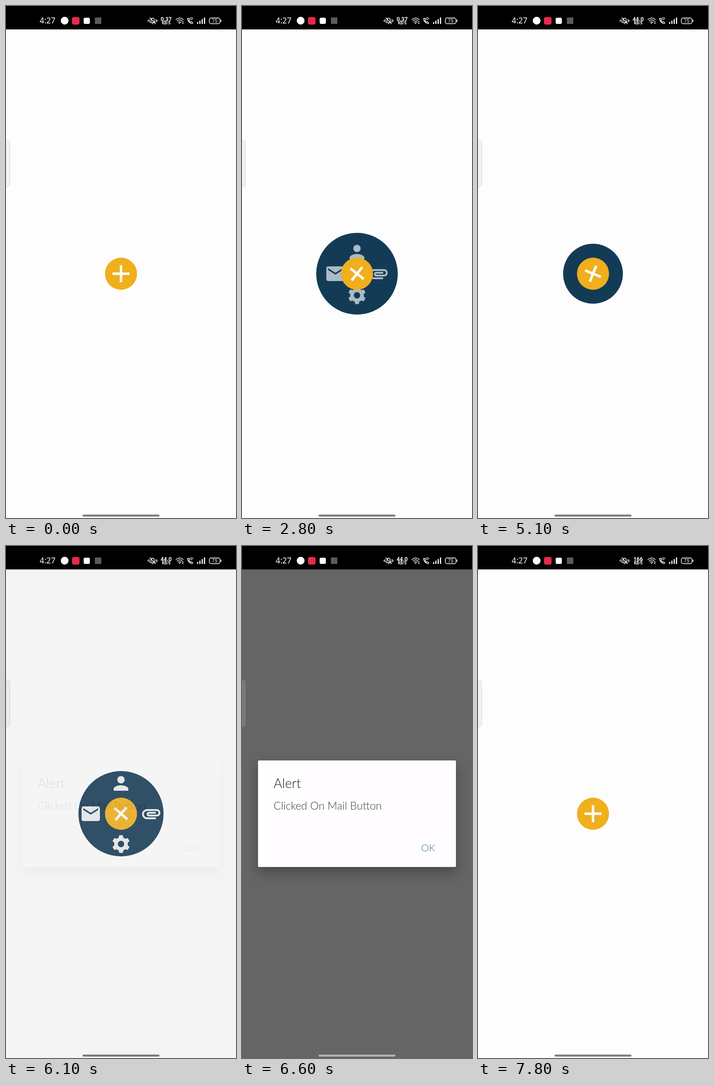
Write an HTML page that moves like this. It is 502 px wide and 1115 px high and loops after 8 s.

```html
<!DOCTYPE html>
<html lang="en">
<head>
<meta charset="utf-8">
<title>Radial menu</title>
<style>
  html, body { margin: 0; width: 100%; height: 100%; overflow: hidden; background: #fefdfe; }
  svg { display: block; width: 502px; height: 1115px; }
  .line { fill: none; stroke: #fff; stroke-width: 1.5; stroke-linecap: round; stroke-linejoin: round; }
  .bold { font: 700 12px Roboto, sans-serif; fill: #fff; text-anchor: middle; }
  #dialog { font-family: Lato, sans-serif; font-weight: 300; }
  #dialog rect { filter: drop-shadow(0 12px 13px rgba(0, 0, 0, .28)); }
</style>
</head>
<body>
<svg viewBox="0 0 502 1115">
  <rect width="502" height="1115" fill="#fefdfe"/>

  <g transform="translate(251 583)">
    <circle id="menu" r="34" fill="#143b56"/>
    <g id="icons" fill="#e9edf0">
      <g data-x="0" data-y="-1"><path transform="scale(2) translate(-12 -12)" d="M12 12c2.2 0 4-1.8 4-4s-1.8-4-4-4-4 1.8-4 4 1.8 4 4 4zm0 2c-2.7 0-8 1.3-8 4v2h16v-2c0-2.7-5.3-4-8-4z"/></g>
      <g data-x="1" data-y="0"><path transform="scale(2) translate(-12 -12)" d="M2 12.5C2 9.46 4.46 7 7.5 7H18c2.2 0 4 1.8 4 4s-1.8 4-4 4H9.5C8.1 15 7 13.9 7 12.5S8.1 10 9.5 10H17v2H9.4c-.55 0-.55 1 0 1H18c1.1 0 2-.9 2-2s-.9-2-2-2H7.5C5.6 9 4 10.6 4 12.5S5.6 16 7.5 16H17v2H7.5C4.46 18 2 15.5 2 12.5z"/></g>
      <g data-x="0" data-y="1"><g id="gear" transform="scale(2)"><circle r="5.45" fill="none" stroke="#e9edf0" stroke-width="3.9"/></g></g>
      <g data-x="-1" data-y="0"><path transform="scale(2) translate(-12 -12)" d="M20 4H4c-1.1 0-2 .9-2 2v12c0 1.1.9 2 2 2h16c1.1 0 2-.9 2-2V6c0-1.1-.9-2-2-2zm0 4l-8 5-8-5V6l8 5 8-5z"/></g>
    </g>
    <circle r="35" fill="#f0af1c"/>
    <path id="plus" d="M-18.5 0H18.5M0-18.5V18.5" stroke="#fff" stroke-width="5.4"/>
  </g>

  <rect id="dim" width="502" height="1115" opacity="0"/>
  <g id="dialog" opacity="0">
    <rect x="35" y="467" width="432" height="232" rx="2.5" fill="#fffdff"/>
    <text x="69" y="527" font-size="28.5" fill="#1d1d1f">Alert</text>
    <text x="69" y="574" font-size="23.6" fill="#38383b">Clicked On Mail Button</text>
    <text x="391" y="665" font-size="21.5" fill="#3a718f">OK</text>
  </g>

  <rect x="-12" y="292" width="20" height="102" rx="6" fill="rgba(198,198,206,.21)" stroke="rgba(120,120,128,.28)"/>
  <rect id="home" x="167" y="1107.5" width="168" height="4.5" rx="2.2" opacity=".5"/>

  <rect width="502" height="51"/>
  <text x="73.5" y="38.3" font-family="Noto Sans, sans-serif" font-size="17.3" fill="#fff">4:27</text>
  <circle cx="128" cy="32" r="8.5" fill="#fff"/>
  <rect x="144" y="24" width="16.5" height="16.5" rx="4" fill="#e52b4c"/>
  <rect x="169.5" y="25.5" width="13.5" height="13.5" rx="3" fill="#fff"/>
  <rect x="194" y="25" width="14" height="14" fill="#5b5b5b"/>

  <g class="line">
    <path d="M315 36h10c-1.5-1.5-1.5-3-1.5-5 0-6-7-6-7 0 0 2 0 3.500-1.500 5zM319 38.500h2M314 25.500l12 13M312.500 29v6M310 31v2M327.500 29v6M330 31v2"/>
    <path d="M371 29.500q8-7 16 0M373.500 32.500q5.500-5 11 0M376 35.500q3-2.500 6 0"/>
    <path d="M396.500 27c-.5 5.500 4.500 11 10 11.500l1-2.500-3-2-1.500 1.300c-1.800-.8-3-2-3.700-3.800l1.200-1.500-1.700-3z"/>
    <path d="M400.500 27.200q4-2.500 8 0M402.500 29.700q2-1.300 4 0" stroke-width="1.200"/>
    <rect x="443.700" y="26" width="23.500" height="12.500" rx="4"/>
    <path d="M469.300 30.500v3.500"/>
  </g>
  <g fill="#fff">
    <circle cx="379" cy="37.500" r="1.300"/>
    <path d="M384 35.500l2-2.500 2 2.500zM384 37l2 2.500 2-2.500z"/>
    <path d="M417 35h2.500v4h-2.500zM422 32h2.500v7h-2.500zM427 28.500h2.500v10.500h-2.500zM432 25h2.500v14h-2.500z"/>
    <text x="455.500" y="36" font-family="Roboto, sans-serif" font-size="10.500" text-anchor="middle">75</text>
  </g>
  <text id="rate" class="bold" x="349.500" y="32.500">0.37</text>
  <text class="bold" x="349.800" y="40.200" style="font-size:8.300px">KB/S</text>
</svg>
<script>
const LOOP = 8000, STEP = 100, LAG = 28;
const $ = id => document.getElementById(id);
const clamp = x => Math.min(1, Math.max(0, x));
const easeOut = x => 1 - (1 - clamp(x)) ** 3;
const ramp = (t, start, length) => clamp((t - start) / length);

// Menu toggles: [start, duration, opens]
const toggles = [[2704, 200, true], [3870, 220, false], [5060, 200, true], [6094, 220, false]];
const rates = [[0, '0.37'], [3400, '44.0'], [7400, '166']];

for (let a = 0; a < 360; a += 60) {
  const tooth = document.createElementNS('http://www.w3.org/2000/svg', 'path');
  tooth.setAttribute('d', 'M-2.6-6.500L-1.900-9.600H1.900L2.600-6.500Z');
  tooth.setAttribute('transform', `rotate(${a})`);
  $('gear').append(tooth);
}

function openness(t) {
  const last = toggles.filter(([start]) => start <= t).pop();
  if (!last) return 0;
  const [start, length, opens] = last;
  const e = easeOut((t - start) / length);
  return opens ? e : 1 - e;
}

function draw(t) {
  const p = openness(t), q = openness(t - LAG);
  $('menu').setAttribute('r', 34 + 64 * p);
  $('plus').setAttribute('transform', `rotate(${45 * p})`);
  for (const icon of $('icons').children) {
    const { x, y } = icon.dataset;
    icon.setAttribute('transform', `translate(${66 * q * x} ${66 * q * y})`);
    icon.setAttribute('opacity', q);
  }

  $('dim').setAttribute('opacity', .6 * (ramp(t, 6080, 360) - ramp(t, 7205, 285)));
  $('dialog').setAttribute('opacity', ramp(t, 6080, 170) - ramp(t, 7205, 113));
  $('home').setAttribute('fill', t >= 6300 && t < 7500 ? '#fff' : '#000');
  $('rate').textContent = rates.filter(([from]) => from <= t).pop()[1];
}

const begin = performance.now();
function tick() {
  const t = (performance.now() - begin) % LOOP;
  draw(Math.floor(t / STEP) * STEP);
  requestAnimationFrame(tick);
}
tick();
</script>
</body>
</html>
```
